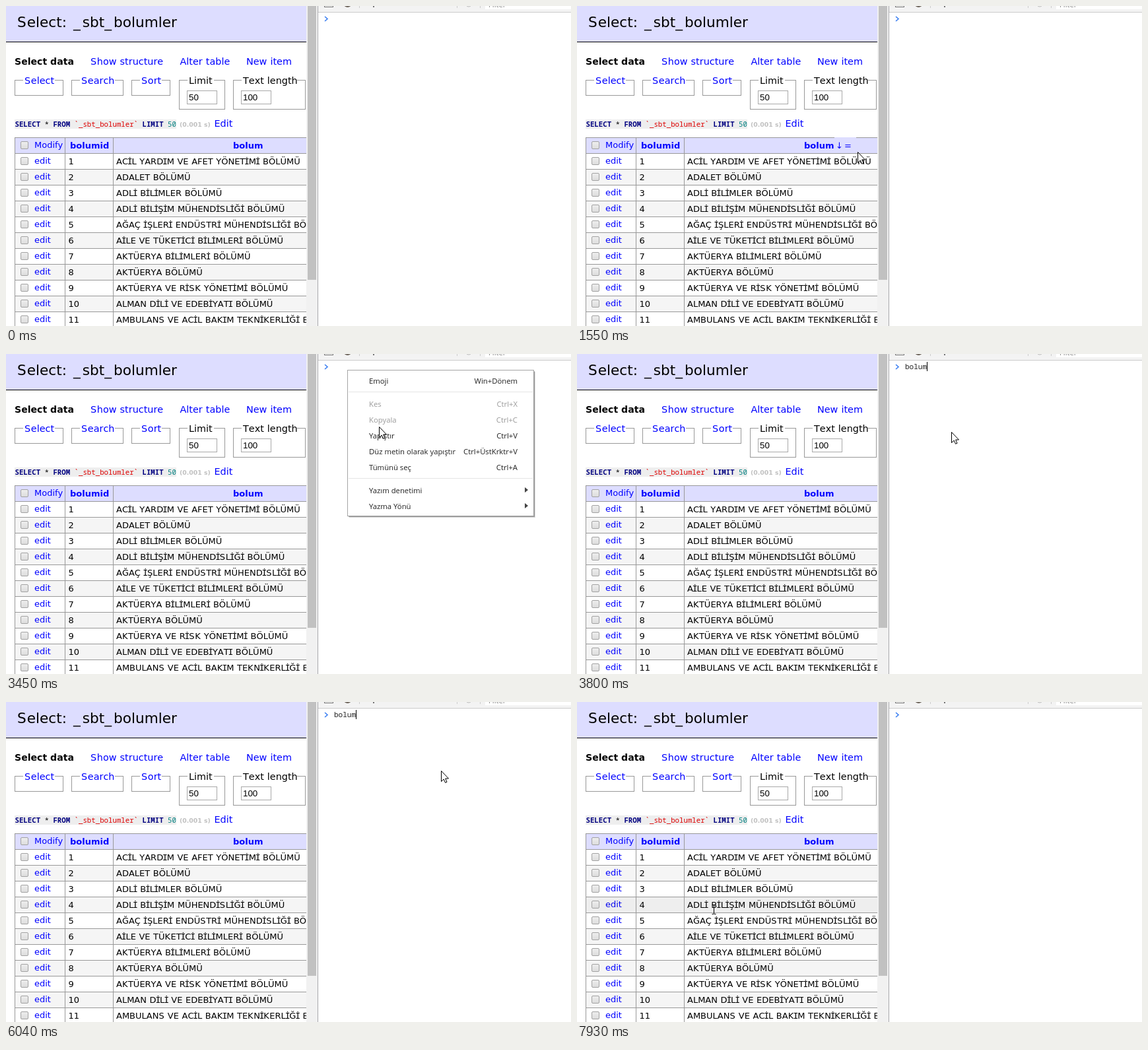
These frames come from a looping animation (856 by 485 pixels, 8000 ms). An HTML page:

```html
<!DOCTYPE html>
<html lang="tr">
<head>
<meta charset="utf-8">
<title>Select: _sbt_bolumler</title>
<style>
html, body { margin: 0; width: 100%; height: 100%; overflow: hidden; background: #fff }
svg { display: block; width: 856px; height: 485px }
text { font: 13px "DejaVu Sans", sans-serif; font-kerning: none; white-space: pre }
.page { word-spacing: .034em }
.h2 { font-size: 21.6px }
.nav { font-size: 14.4px }
.active { font-size: 14.1px; font-weight: bold }
.bold { font-weight: bold }
.time { font-size: 9.3px; font-weight: bold }
.sql { font: 10.73px "Noto Sans Mono", monospace }
.prompt { font: 11px "Noto Sans Mono", monospace }
.input { font: 13.33px "Liberation Sans", Arial, sans-serif }
.menu { font: 11.3px "Open Sans", sans-serif }
.slab { font-family: "DejaVu Sans Mono", monospace; letter-spacing: -.091em }
.hover { fill: #eee; mix-blend-mode: darken }
</style>
</head>
<body>
<svg viewBox="0 0 856 485">
  <defs>
    <linearGradient id="box" x2="0" y2="1"><stop stop-color="#eee"/><stop offset="1" stop-color="#dcdcdc"/></linearGradient>
  </defs>
  <g id="still"></g>
  <g id="live"></g>
</svg>
<script>
const LOOP = 8000, BLUE = '#00f', LINE = '#999', HEAD = '#ddf';
const still = document.getElementById('still'), live = document.getElementById('live');

const rect = (x, y, w, h, fill, extra = '') =>
  `<rect x="${x}" y="${y}" width="${w}" height="${h}" fill="${fill}" ${extra}/>`;
const frame = (x, y, w, h, stroke, fill = 'none', extra = '') =>
  rect(x + .5, y + .5, w - 1, h - 1, fill, `stroke="${stroke}" ${extra}`);
const text = (x, y, str, cls, fill = '#000', anchor = 'start') =>
  `<text x="${x}" y="${y}" class="${cls}" fill="${fill}" text-anchor="${anchor}">${str}</text>`;

// Page text: wide glyphs get extra advance, capital I gets slab serifs.
const advance = { _: .136, ':': .117, S: .049, K: .037 };
const page = (x, y, str, cls = '', fill) => text(x, y, str.replace(/[Iİ_:SK]/g, c => advance[c]
  ? `<tspan style="letter-spacing:${advance[c]}em">${c}</tspan>`
  : `<tspan class="slab" dx="-.09em">${c}</tspan>`), 'page ' + cls, fill);

const departments = ['ACİL YARDIM VE AFET YÖNETİMİ', 'ADALET', 'ADLİ BİLİMLER', 'ADLİ BİLİŞİM MÜHENDİSLİĞİ',
  'AĞAÇ İŞLERİ ENDÜSTRİ MÜHENDİSLİĞİ', 'AİLE VE TÜKETİCİ BİLİMLERİ', 'AKTÜERYA BİLİMLERİ', 'AKTÜERYA',
  'AKTÜERYA VE RİSK YÖNETİMİ', 'ALMAN DİLİ VE EDEBİYATI', 'AMBULANS VE ACİL BAKIM TEKNİKERLİĞİ'];

const checkbox = y => frame(22, y, 12, 12, '#a2a2a2', 'url(#box)', 'rx="1.5"');

function fieldset(x, w, h, legend, gap, value) {
  return frame(x, 112, w, h, LINE) + rect(x + 13, 111, gap, 3, '#fff') +
    page(x + 15, 118, legend, 'nav', value ? '#000' : BLUE) +
    (value ? frame(x + 12, 128, 46, 21, '#a9a9a9', '#fff') + text(x + 15, 143, value, 'input') : '');
}

function table() {
  let out = rect(13, 199, 442, 25, HEAD) + checkbox(205) + page(43, 215, 'Modify', '', BLUE) +
    text(97, 216, 'bolumid', 'bold', BLUE) + text(344, 216, 'bolum', 'bold', BLUE);
  departments.forEach((name, i) => {
    const y = 223 + 24 * i;
    out += (i % 2 ? rect(13, y, 442, 24, '#f5f5f5') : '') + rect(13, y, 442, 1, LINE) + checkbox(y + 6) +
      page(43, y + 16, 'edit', '', BLUE) + page(94.5, y + 17, `${i + 1}`) + page(167, y + 17, name + ' BÖLÜMÜ');
  });
  return out + rect(13, 199, 442, 1, LINE) + [13, 89, 162].map(x => rect(x, 199, 1, 290, LINE)).join('');
}

function query() {
  const span = (str, fill, weight = 400) => `<tspan fill="${fill}" font-weight="${weight}">${str}</tspan>`;
  return rect(13, 172, 245, 14, '#eee') + text(13.5, 183, span('SELECT', '#000080', 700) + ' * ' +
    span('FROM', '#000080', 700) + ' ' + span('`_sbt_bolumler`', '#d00') + ' ' +
    span('LIMIT', '#000080', 700) + ' ' + span('50', '#007f7f'), 'sql') +
    text(263, 183, '(0.001 s)', 'time', '#c0c0c0') + page(315.5, 183, 'Edit', 'nav', BLUE);
}

function devtools() {
  return rect(455, 0, 17, 485, '#f1f1f1') + rect(457, 0, 13, 415, '#c1c1c1') +
    rect(472, 0, 384, 485, '#fff') + rect(473, 0, 383, 9, '#f3f3f3') + rect(473, 9, 383, 1, '#ccc') +
    rect(472, 0, 1, 485, '#a8a8ac') + rect(726, 0, 130, 5, '#fff') +
    frame(482, -8, 14, 10, '#777') + '<circle cx="517.5" cy="-4" r="6" fill="#6e655c"/>' +
    '<circle cx="701" cy="-4" r="5" fill="none" stroke="#bbb"/>' + rect(556, 0, 2, 2, '#777') +
    [535, 683, 718].map(x => rect(x, 0, 1, 3, '#ccc')).join('') + text(731, 2, 'Filter', 'menu', '#888') +
    '<path d="M483 16l4 3.5l-4 3.5" fill="none" stroke="#367cf1" stroke-width="1.5"/>';
}

still.innerHTML = rect(0, 0, 856, 485, '#fff') + rect(0, 0, 455, 54, HEAD) + rect(0, 54, 455, 1, '#000') +
  page(17, 32, 'Select: _sbt_bolumler', 'h2') + text(13, 89, 'Select data', 'active') +
  page(128, 89, 'Show structure', 'nav', BLUE) + page(263.5, 89, 'Alter table', 'nav', BLUE) +
  page(364, 89, 'New item', 'nav', BLUE) +
  fieldset(13, 74, 24, 'Select', 48) + fieldset(99, 79, 24, 'Search', 53) + fieldset(190, 59, 24, 'Sort', 33) +
  fieldset(262, 70, 45, 'Limit', 40, '50') + fieldset(344, 110, 45, 'Text length', 84, '100') +
  query() + table() + devtools();

// Pointer positions: time, x, y. Each one holds until the next.
const moves = [
  [0, -50, 0], [170, 495, 307], [345, 436, 262], [520, 392, 232], [690, 367, 211], [1210, 361, 219],
  [1380, 425, 221], [1560, 496, 232], [1730, 538, 242], [1900, 537, 180], [2080, 533, 112], [2250, 527, 65],
  [2420, 524, 47], [2590, 520, 32], [2760, 517, 24], [3110, 527, 48], [3280, 548, 86], [3450, 565, 110],
  [3630, 567, 118], [4650, 568, 117], [4830, 575, 114], [5000, 590, 111], [5170, 612, 107], [5350, 630, 104],
  [5520, 641, 104], [5700, 650, 104], [5870, 656, 104], [6040, 659, 104], [6210, 663, 103], [6390, 667, 102],
  [6560, 670, 101], [7590, 560, 170], [7760, 330, 328], [7930, 207, 314]];
const caretOn = [[2760, 3280], [3800, 4150], [4650, 5170], [5700, 6210], [6560, 7590]];
const within = (t, [from, to]) => t >= from && t < to;

const shapes = {
  arrow: '<path d="M.5 .5V16.5L4.2 13L6.6 18.3L9 17.2L6.7 12H11.5Z" fill="#fff" stroke="#000"/>',
  beam: '<path d="M-3-7h2q1 0 1 1V6q0 1-1 1h-2M3-7H1Q0-7 0-6V6q0 1 1 1H3" fill="none" stroke="#000"/>',
  hand: '<path d="M-1.5 2a1.7 1.7 0 0 1 3.4 0V8q2.4-1 2.6 1q2.4-.8 2.6 1q2.2-.5 2.2 1.8V16q0 3-2 5v2.5H-.5V21' +
    'Q-4 17-6.5 13.5q-.8-2.5 1.5-2.2L-1.5 13.5ZM4.5 9v3M7.1 10v3" fill="#fff" stroke="#000"/>'
};

const menuItems = [[45, 'Emoji', 'Win+Dönem'], [80, 'Kes', 'Ctrl+X', 1], [104, 'Kopyala', 'Ctrl+C', 1],
  [128, 'Yapıştır', 'Ctrl+V'], [152, 'Düz metin olarak yapıştır', 'Ctrl+ÜstKrktr+V'], [176, 'Tümünü seç', 'Ctrl+A'],
  [211, 'Yazım denetimi'], [235, 'Yazma Yönü']];

function menu(pointerY) {
  return rect(520, 27, 282, 221, '#000', 'opacity=".15"') + rect(519, 26, 282, 221, '#000', 'opacity=".3"') +
    frame(517, 24, 283, 222, '#a5a5a5', '#fff') +
    rect(519, 57, 279, 1, '#e5e5e5') + rect(519, 188, 279, 1, '#e5e5e5') +
    menuItems.map(([y, name, keys, off]) => {
      const fill = off ? '#9a9a9a' : '#222';
      return (!off && within(pointerY, [y - 16, y + 8]) && pointerY > 100 ? rect(519, y - 16, 279, 24, '#ececec') : '') +
        text(550, y, name, 'menu', fill) + (keys ? text(775, y, keys, 'menu', fill, 'end')
          : `<path d="M786 ${y - 9}l5 4l-5 4z" fill="#444"/>`);
    }).join('');
}

function scene(t) {
  const [, x, y] = moves.findLast(m => m[0] <= t);
  const onPage = x > 13 && x < 455, row = Math.floor((y - 199) / 24);
  const onLink = onPage && x > 343 && x < 390 && within(y, [205, 218]);
  const typed = within(t, [3800, 6910]) ? 'bolum' : within(t, [6910, 7060]) ? 'bo' : '';
  let out = '';
  if (onPage && row > 0) out += rect(14, 200 + 24 * row, 441, 23, '#eee', 'class="hover"');
  if (onPage && x > 162 && row === 0) out += rect(390, 199, 33, 24, HEAD) +
    text(392, 216, '↓', '', BLUE) + text(405, 216, '=', '', BLUE);
  if (onLink) out += rect(344, 203, 46, 17, HEAD) + text(344, 216, 'bolum', 'bold', 'red') + rect(344, 217, 46, 1, 'red');
  out += text(497, 23, typed, 'prompt', '#222');
  if (caretOn.some(span => within(t, span))) out += rect(497 + 6.6 * typed.length, 12, 1, 14, '#000');
  if (within(t, [2940, 3800])) out += menu(y);
  const shape = onLink ? 'hand' : onPage && row > 0 ? 'beam' : 'arrow';
  const half = shape === 'beam' ? .5 : 0;
  return out + `<g transform="translate(${x + half} ${y + half})">${shapes[shape]}</g>`;
}

let shown;
function draw() {
  const next = scene(performance.now() % LOOP);
  if (next !== shown) live.innerHTML = shown = next;
  requestAnimationFrame(draw);
}
draw();
</script>
</body>
</html>
```
